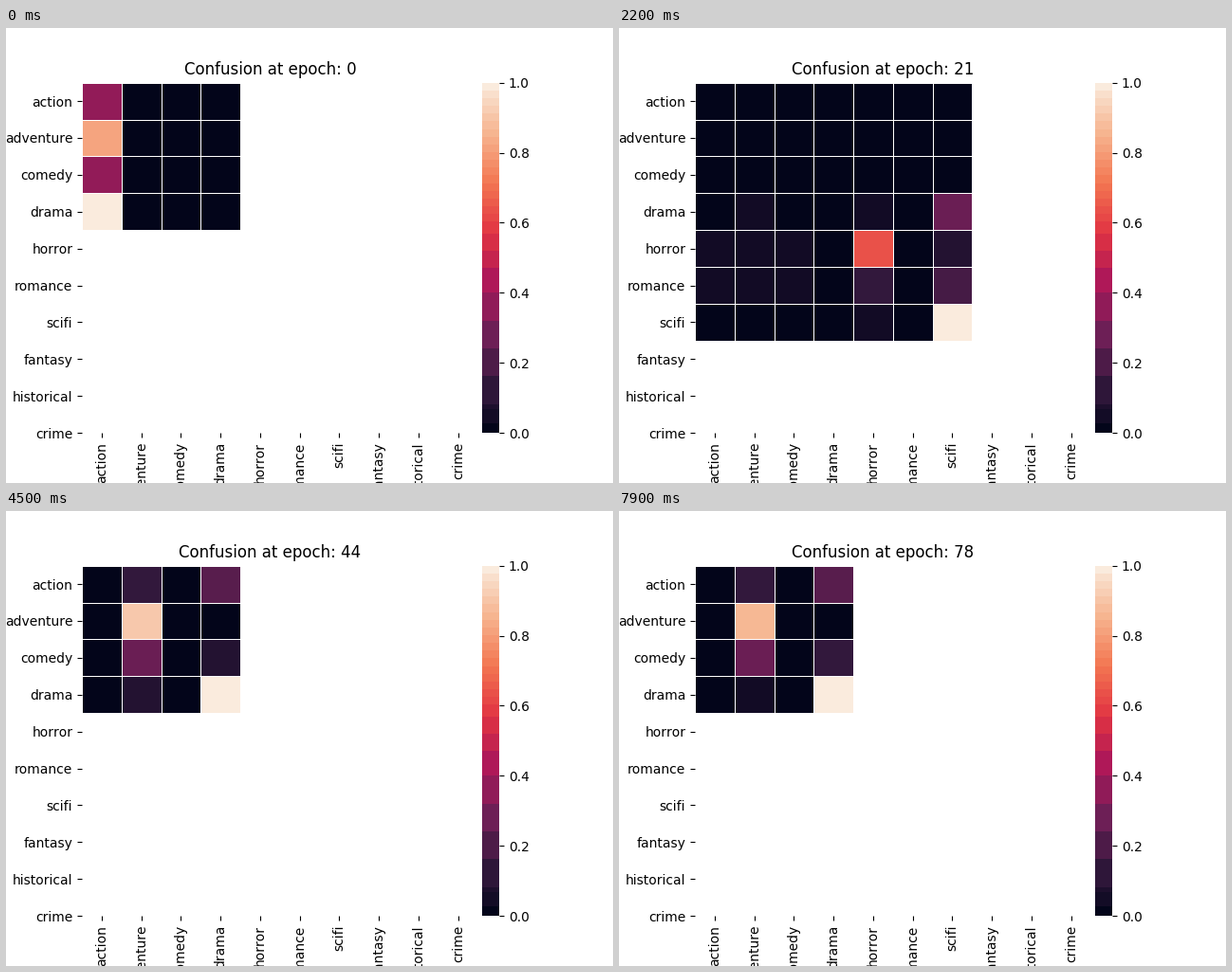
Recreate the animation shown at these times as a matplotlib script. Size 640 by 480 pixels, loop 8 s.

```python
import numpy as np
import matplotlib.pyplot as plt
from matplotlib.animation import FuncAnimation
from matplotlib.colors import LinearSegmentedColormap

plt.rcParams["font.family"] = "DejaVu Sans"
plt.rcParams["text.kerning_factor"] = 6

GENRES = ["action", "adventure", "comedy", "drama", "horror",
          "romance", "scifi", "fantasy", "historical", "crime"]
SPAN = len(GENRES) - 0.5      # the last half cell falls outside the axes

# Evenly spaced from 0 to 1
ROCKET = LinearSegmentedColormap.from_list("rocket", [
    "#03051a", "#35193e", "#701f57", "#ad1759",
    "#e13342", "#f37651", "#f6b48f", "#faebdd"])

# The colour bar has coarse steps in the dark part and fine ones above
EDGES = np.concatenate([[0, .027, .067], np.linspace(.083, .4, 5),
                        np.linspace(.47, .57, 3), np.linspace(.603, 1, 19)])

TOTALS = np.array([8, 18, 8, 22])     # samples of each true class
PEAK = TOTALS.max()

# Share of samples predicted as the 2nd and the 4th true class
EARLY = np.array([[.05, .3], [.5, .125], [.125, .21], [0, 1]])
LATE = np.array([[.11, .25], [.87, 0], [.26, .12], [.05, 1]])
SURGE = np.array([.09, -.05])         # passing drift around epoch 52

# Predictions of three classes that never occur, fading out by STRAY_END
STRAYS = np.outer([.25, 1.5, .8, .35], [.9, 1.6, .6])
STRAY_END = 30


def confusion(epoch):
    n = STRAYS.shape[1] if 0 < epoch < STRAY_END else 0
    counts = np.zeros((4, n + 4))
    if epoch == 0:
        counts[:, 0] = TOTALS         # everything lands in one class
        return counts / PEAK
    if n:
        counts[:, :n] = STRAYS * min(1, (STRAY_END - epoch) / 14)
    learned = np.clip((epoch - 12) / 30, 0, 1)
    hits = EARLY + (LATE - EARLY) * learned
    hits = hits + SURGE * np.exp(-((epoch - 52) / 8) ** 2)
    counts[:, [n + 1, n + 3]] = hits.clip(0) * PEAK
    noise = np.random.default_rng(epoch).normal(0, 0.25, counts.shape)
    counts = np.round(counts + noise * (counts > 0)).clip(0, PEAK)
    counts[3, -1] = PEAK
    return np.vstack([np.zeros((n, n + 4)), counts]) / PEAK


def bare(axes):
    for spine in axes.spines.values():
        spine.set_visible(False)


fig = plt.figure(figsize=(6.4, 4.8), dpi=100, facecolor="white")
ax = fig.add_axes([0.125, 0.11, 0.62, 0.77])
bare(ax)
ticks = np.arange(len(GENRES)) + 0.5
ax.set_xticks(ticks, GENRES, rotation=90)
ax.set_yticks(ticks, GENRES)
title = ax.set_title("")

bar_ax = fig.add_axes([0.78375, 0.11, 0.77 * 4.8 / 20 / 6.4, 0.77])
bare(bar_ax)
levels = (EDGES[:-1] + EDGES[1:]) / 2
levels[[0, -1]] = 0, 1
bar_ax.pcolormesh([0, 1], EDGES, levels[:, None], cmap=ROCKET, vmin=0, vmax=1)
bar_ax.set_xticks([])
bar_ax.yaxis.tick_right()
bar_ax.set_yticks(np.linspace(0, 1, 6))
bar_ax.set_ylim(0, 1)


def draw(i):
    epoch = max(0, i - 1)
    for mesh in list(ax.collections):
        mesh.remove()
    ax.pcolormesh(confusion(epoch), cmap=ROCKET, vmin=0, vmax=1,
                  edgecolors="white", linewidth=0.5)
    ax.set_xlim(0, SPAN)
    ax.set_ylim(SPAN, 0)
    title.set_text(f"Confusion at epoch: {epoch}")
    return ()


anim = FuncAnimation(fig, draw, frames=80, interval=100, repeat=True,
                     repeat_delay=0)
plt.show()
```
